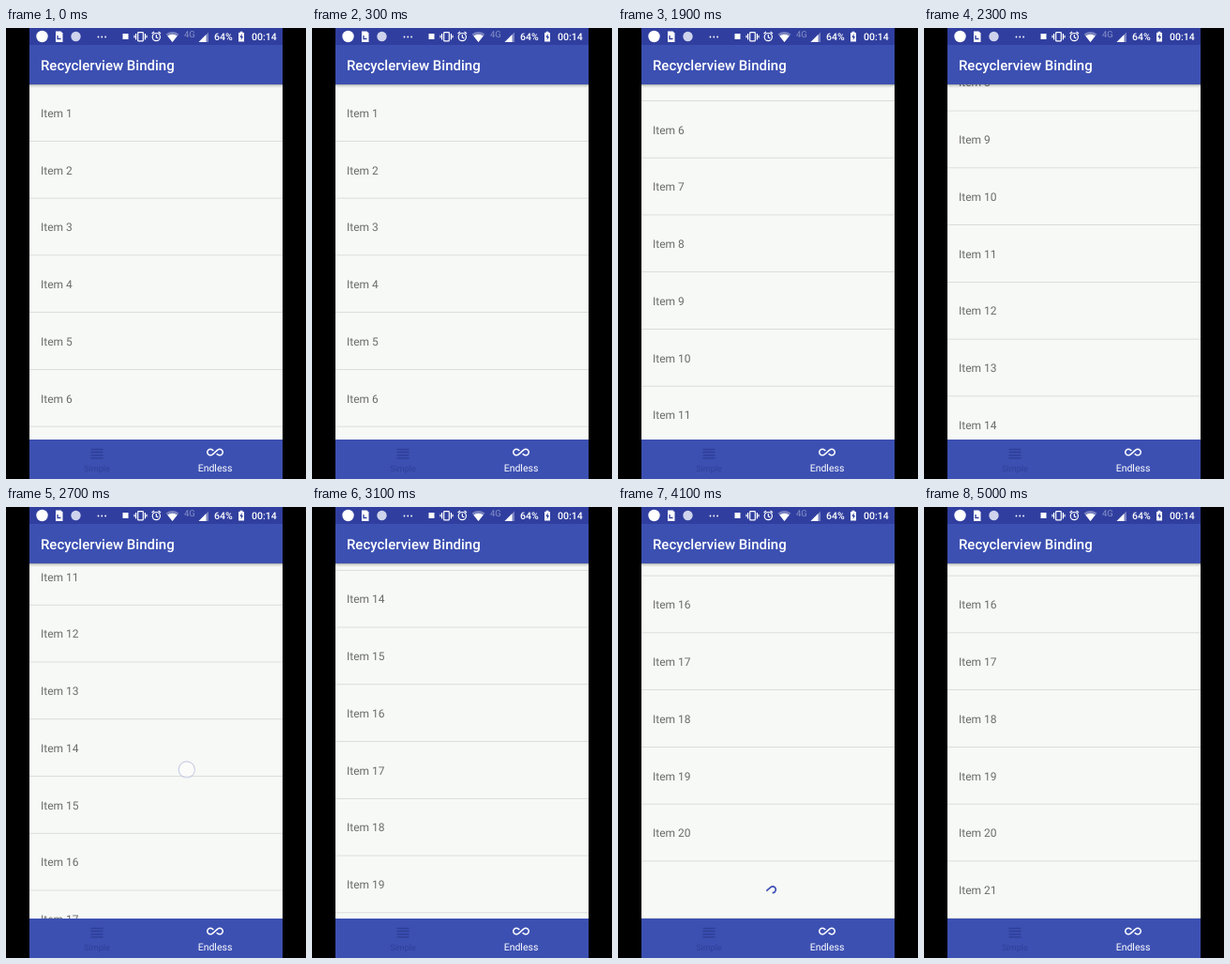
These frames come from a looping animation (320x480 px, 5.6 s). An HTML page:

```html
<!DOCTYPE html>
<html lang="en">
<head>
<meta charset="utf-8">
<title>Recyclerview Binding</title>
<style>
  html, body { margin: 0; width: 100%; height: 100%; overflow: hidden; background: #000; }
  svg { display: block; width: 100%; height: 100%; font-family: Roboto, "Noto Sans", sans-serif; }
  text { text-rendering: geometricPrecision; }
</style>
</head>
<body>
<svg viewBox="0 0 320 480" xmlns="http://www.w3.org/2000/svg">
  <defs>
    <clipPath id="view"><rect x="25" y="60" width="270" height="378"/></clipPath>
    <linearGradient id="shade" x2="0" y2="1">
      <stop offset="0" stop-opacity=".34"/>
      <stop offset=".4" stop-opacity=".12"/>
      <stop offset="1" stop-opacity="0"/>
    </linearGradient>
  </defs>
  <rect width="320" height="480"/>

  <rect x="25" y="60" width="270" height="378" fill="#f7f9f6"/>
  <g clip-path="url(#view)">
    <g id="rows" font-size="12" fill="#6b6c6b"></g>
    <path id="loader" d="M12 12L15.5 8.9A4.4 4.4 0 1 1 15.5 15.1L8.5 8.9A4.4 4.4 0 1 0 8.5 15.1Z"
      pathLength="100" stroke-dasharray="42 58" fill="none" stroke="#3f51b5" stroke-width="2.3"/>
    <rect x="25" y="60" width="270" height="4" fill="url(#shade)"/>
  </g>

  <!-- Status bar -->
  <rect x="25" width="270" height="18" fill="#303f9f"/>
  <g fill="#fff">
    <circle cx="38.5" cy="9" r="6.2"/>
    <path d="M53 3.5h5.5l2 2v9.5H53z"/>
    <path d="M55 8v3.5h3.5" fill="none" stroke="#303f9f" stroke-width="1.3"/>
    <circle cx="74.5" cy="9" r="5.2" fill="#cfd4ec"/>
    <path d="M98.5 9.5h9" stroke="#fff" stroke-width="1.8" stroke-linecap="round" stroke-dasharray="0 3.8"/>
    <rect x="124.5" y="6" width="6" height="6"/>
    <g fill="none" stroke="#fff" stroke-width="1.2">
      <rect x="140.7" y="4.6" width="5.6" height="9.2" rx=".6"/>
      <path d="M138.6 6v6.4M148.4 6v6.4M137 7.8v2.8M150 7.8v2.8"/>
      <circle cx="160.3" cy="9.6" r="4.1"/>
      <path d="M160.3 7v2.8l2 1.2M155.6 6l2.4-2M165 6l-2.4-2"/>
    </g>
    <path d="M177.5 15L170.6 6.5Q177.5 1.6 184.4 6.5z" opacity=".35"/>
    <path d="M177.5 15L172.3 8.5Q177.5 5.2 182.7 8.5z"/>
    <path d="M205.5 15H216V4.5z" opacity=".35"/>
    <path d="M205.5 15H213.5V7z"/>
    <path d="M248 5h1.6V3.8h2.8V5h1.6v9.6h-6z"/>
    <path d="M251.6 6l-2.2 4h1.4v3l2.2-4h-1.4z" fill="#303f9f"/>
    <text x="190" y="9.7" font-size="9.5" opacity=".42">4G</text>
    <g font-size="10.5" font-weight="500">
      <text x="222" y="13">64%</text>
      <text x="262" y="13">00:14</text>
    </g>
  </g>

  <!-- App bar -->
  <rect x="25" y="18" width="270" height="42" fill="#3c50b2"/>
  <text x="37" y="44.9" font-size="15" font-weight="500" fill="#fff">Recyclerview Binding</text>

  <!-- Bottom navigation -->
  <rect x="25" y="438" width="270" height="42" fill="#3c50b2"/>
  <g fill="#2f3f98" text-anchor="middle">
    <path d="M90.5 447.7h13v1.5h-13zm0 3.1h13v1.5h-13zm0 3.1h13v1.5h-13zm0 3.1h13v1.5h-13z"/>
    <text x="97" y="472.3" font-size="9">Simple</text>
  </g>
  <g fill="#fff" text-anchor="middle">
    <path transform="translate(214 442.5) scale(.75)" fill="none" stroke="#fff" stroke-width="2"
      d="M9.8 9.9L8.5 8.9A4.4 4.4 0 1 0 8.5 15.1L15.5 8.9A4.4 4.4 0 1 1 15.5 15.1L14.2 14.1"/>
    <text x="223" y="472.3" font-size="10.5">Endless</text>
  </g>

  <circle id="touch" r="8.6" fill="#fff" fill-opacity=".65" stroke="#b4b9dc" stroke-width="1.1"/>
</svg>
<script>
const LOOP = 5600, STEP = 100, LOADED = 4700;
const TOP = 60, ROW = 60.75, COUNT = 21, MAX_SCROLL = COUNT * ROW - 378;
const GLIDE = 1200, HOLD = 300;

const swipes = [
  { start: 1500, x: 201.5, y: 391, dist: 514.7 },
  { start: 2500, x: 201.5, y: 388.4, dist: 356.5 },
  { start: 3400, x: 197.6, y: 372.8, dist: 103 }
];

const $ = id => document.getElementById(id);
const rows = $('rows'), loader = $('loader'), touch = $('touch');

function set(el, attrs) {
  for (const k in attrs) el.setAttribute(k, attrs[k]);
  return el;
}

function add(name, attrs, parent) {
  const el = document.createElementNS('http://www.w3.org/2000/svg', name);
  return parent.appendChild(set(el, attrs));
}

const items = Array.from({ length: COUNT }, (_, i) => {
  const line = add('rect', { x: 25, width: 270, height: .75, fill: '#d2d4d2' }, rows);
  const label = add('text', { x: 37 }, rows);
  label.textContent = 'Item ' + (i + 1);
  return { line, label };
});

// Distance covered by a swipe: fast at first, then slowing to rest
function travel({ start, dist }, t) {
  const p = Math.min(1, Math.max(0, (t - start) / GLIDE));
  return dist * p * (2 - p);
}

function drawList(scroll, loaded) {
  items.forEach(({ line, label }, i) => {
    const y = TOP + i * ROW - scroll;
    set(line, { y: y + ROW - .75 });
    set(label, { y: y + 34.75 });
  });
  items[COUNT - 1].label.style.display = loaded ? '' : 'none';
}

function drawLoader(t, scroll, loaded) {
  const cy = TOP + (COUNT - .5) * ROW - scroll;
  loader.style.display = loaded ? 'none' : '';
  set(loader, {
    transform: `translate(151 ${cy - 9.4}) scale(.75)`,
    'stroke-dashoffset': -((t / 10 + 85) % 100)
  });
}

function drawTouch(t) {
  const swipe = swipes.find(s => t >= s.start && t < s.start + HOLD);
  touch.style.display = swipe ? '' : 'none';
  if (!swipe) return;
  const d = travel(swipe, t), age = t - swipe.start;
  set(touch, {
    cx: swipe.x - d * .08,
    cy: swipe.y - d,
    opacity: Math.sin(Math.PI * (age + 100) / (HOLD + 100))
  });
}

function draw(now) {
  const t = Math.floor(now % LOOP / STEP) * STEP;
  const loaded = t >= LOADED;
  const scroll = Math.min(MAX_SCROLL, swipes.reduce((sum, s) => sum + travel(s, t), 0));
  drawList(scroll, loaded);
  drawLoader(t, scroll, loaded);
  drawTouch(t);
}

function tick() {
  draw(performance.now());
  requestAnimationFrame(tick);
}
tick();
</script>
</body>
</html>
```
